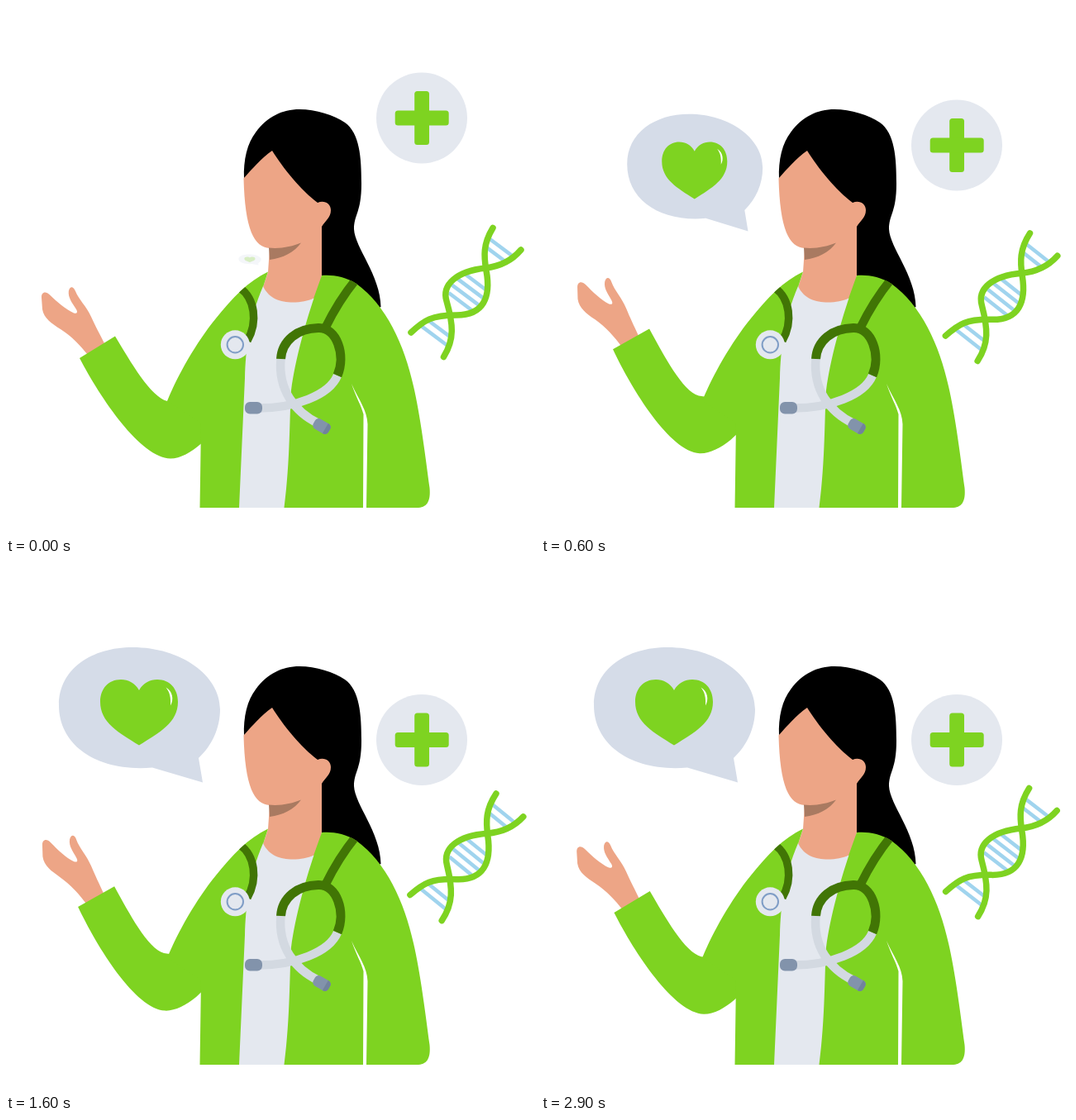
Write an HTML page with a canvas that moves like this. It is 640x640 px and loops after 3000 ms.

```html
<!DOCTYPE html>
<html lang="en">
<head>
<meta charset="utf-8">
<title>Doctor</title>
<style>
  html, body { margin: 0; width: 100%; height: 100%; overflow: hidden; background: #fff; }
  canvas { display: block; width: 640px; height: 640px; }
</style>
</head>
<body>
<canvas id="stage" width="640" height="640"></canvas>
<script>
const ctx = document.getElementById('stage').getContext('2d');
const LOOP = 3000, STEP = 100;

const GREEN = '#7ed321', DARK = '#417505', SKIN = '#eda586', SHADE = '#a97a61';
const PALE = '#e4e8ef', BUBBLE = '#d5dce8', TUBE = '#d3d9e1', TIP = '#8293ab';
const RUNG = '#a0d4ee';

const shapes = {
  hair: 'M288 209C287 186 292 166 302 153C316 134 334 125 355 125C375 125 397 132 410 141C428 154 430 183 430 215C430 250 421 252 421 270C422 292 453 326 453.5 364L420 380L382 340V250L320 180Z',
  face: 'M287.5 208.5C297 198 309 184 322 175C335 196 357 223 377 238C385 234.500 393 239 393 247C393 256 386 260 382 267V326L372 380H311V340L317 322L319 293C300 292 289 270 287.500 208.500Z',
  chin: 'M318 292.500C332 294 346 291 357 286.500C349 298 335 305 319 307Z',
  hand: 'M43 353C42.500 346 48 344.500 53 349.500C62 358 72 367 82 371.500C86 372.500 87 370.500 85 367C80 359 75 353 75.800 345C77 338.500 81.500 338.500 84 345C88 355 97 363 103 376C108 387 113 396 120 410L99 422C90 411 80 400 66 391C55 384 46 378 44 367Z',
  sleeve: 'M89 426L132 399.500C151 431 175 473 195 478L205 479L260 450V505L236 529.500C224 540 211 547.500 199 547.500C163 547 114 474 89 426Z',
  coat: 'M234.500 607L236 505L195 478C208 446 231 406 253.500 378.500C274 353 293 333 317 321.500L311 340L340 400L372 354L382 326C395 325 410 327 424 336C460 362 482 410 493 460C501 494 507.500 545 512.500 583C514 600 509 607 497 607Z',
  shirt: 'M311 339C318 354 332 358.500 347 358.500C357 358.500 365 357 372.500 353.500C363 382 350 427 345 465C343 492 344 550 336.500 607H282L289 450C290 415 294 379 311 339Z',
  gap: 'M418 457C423 472 430 484 432.500 494L432 607H436L437.500 506C437 489 427 477 418 457Z',
  bubble: 'M64 172C64 128 104 102 153 102C212 102 259 136 259 177C259 200 249 221 233 236L238 265.500L177 247.500C112 253 64 222 64 172Z',
  heart: 'M161 154C166 145 174 141 183 141C198 141 208 152 208 168C208 193 186 205 161 220.500C136 205 114 193 114 168C114 152 124 141 139 141C148 141 156 145 161 154Z',
  shine: 'M193.500 150.500C201.500 155 203.500 165 199 172.500C199.500 163 198.500 157 193.500 150.500Z',
  strapL: 'M283 341C301 354 305 382 292 405',
  strapR: 'M424 330Q402 357 386 390',
  loop: 'M332.500 427C334 405 352 390 378 389.500C400 389 411.500 422 401 447',
  tubeA: 'M332.500 427C329 464 349 491 378 505',
  tubeB: 'M401 447C391 471 349 486.500 306 486.500',
  strandA: 'M589 268.500C577 288 578 303 581 320C587 352 578 374 545 374C515 374 506 380 490 395',
  strandB: 'M623 295C612 308 598 315 580 317C545 321 527 337 533 357C541 385 543 403 529.500 424.500'
};
for (const name in shapes) shapes[name] = new Path2D(shapes[name]);

// Poses at every 200 ms
const growX = [0, .25, .56, .815, .96, 1.005, 1.003, 1];
const growY = [0, .23, .545, .855, .97, 1.002, 1.002, 1];
const dnaTurn = [0, .18, .36, .57, .77, .93, 1.05, 1.05, .93, .77, .57, .4, .36];
const armTurn = [0, .4, .75, 1, .9, .58, .68, .9, .93, .76, .57, .37, .27];

// Smooth curve through evenly spaced poses, holding the last one
function track(keys, t) {
  const pos = Math.min(t / 200, keys.length - 1);
  const i = Math.floor(pos), f = pos - i;
  const at = k => keys[Math.max(0, Math.min(keys.length - 1, k))];
  const a = at(i - 1), b = at(i), c = at(i + 1), d = at(i + 2);
  return b + f * (c - a + f * (2 * a - 5 * b + 4 * c - d + f * (3 * (b - c) + d - a))) / 2;
}

function fill(path, color) {
  ctx.fillStyle = color;
  ctx.fill(path);
}

function stroke(path, color, width, cap = 'butt') {
  ctx.strokeStyle = color;
  ctx.lineWidth = width;
  ctx.lineCap = cap;
  ctx.stroke(path);
}

function disc(x, y, r, color) {
  ctx.beginPath();
  ctx.arc(x, y, r, 0, Math.PI * 2);
  ctx.fillStyle = color;
  ctx.fill();
}

function box(x, y, w, h, r, color) {
  ctx.beginPath();
  ctx.roundRect(x, y, w, h, r);
  ctx.fillStyle = color;
  ctx.fill();
}

function group(draw) {
  ctx.save();
  draw();
  ctx.restore();
}

function turn(x, y, angle) {
  ctx.translate(x, y);
  ctx.rotate(angle);
  ctx.translate(-x, -y);
}

function drawBadge(t) {
  const p = Math.min(1, t / 1400);
  const ease = p + .22 * (p * p * (3 - 2 * p) - p);
  const y = 135.5 + 78.5 * ease;
  disc(503, y, 55, PALE);
  box(494.2, y - 32.5, 17.8, 65, 3.5, GREEN);
  box(470.7, y - 9, 65, 18, 3.5, GREEN);
}

function drawDna(t) {
  turn(327, 372, .043 * track(dnaTurn, t));
  const rungs = new Path2D();
  for (const d of [-67, -56.5, -15, -5, 5, 15, 56.5, 67]) {
    const half = 22 * Math.abs(Math.cos(Math.PI * d / 71.4));
    const x = 558.5 + .6 * d, y = 345.5 - .8 * d;
    rungs.moveTo(x - .8 * half, y - .6 * half);
    rungs.lineTo(x + .8 * half, y + .6 * half);
  }
  stroke(rungs, RUNG, 4.5);
  stroke(shapes.strandA, GREEN, 7.5, 'round');
  stroke(shapes.strandB, GREEN, 7.5, 'round');
}

function drawBubble(t) {
  const px = track(growX, t), py = track(growY, t);
  ctx.globalAlpha = Math.min(1, .25 + t / 300);
  ctx.translate(295 - 133.5 * px, 307 - 123.25 * py);
  ctx.scale(.14 + .86 * px, .08 + .92 * py);
  ctx.translate(-161.5, -183.75);
  fill(shapes.bubble, BUBBLE);
  fill(shapes.heart, GREEN);
  fill(shapes.shine, '#fff');
}

function drawArm(t) {
  turn(350, 372, .041 * track(armTurn, t));
  fill(shapes.hand, SKIN);
  fill(shapes.sleeve, GREEN);
}

function drawStethoscope() {
  group(() => {
    ctx.clip(shapes.coat);
    stroke(shapes.strapL, DARK, 9.5);
    stroke(shapes.strapR, DARK, 10.5);
  });
  stroke(shapes.tubeA, TUBE, 10.5);
  stroke(shapes.tubeB, TUBE, 10.5);
  stroke(shapes.loop, DARK, 11);
  box(289, 479, 21, 14.5, 6, TIP);
  group(() => {
    ctx.translate(382, 508.5);
    ctx.rotate(Math.PI / 6);
    box(-10.5, -7, 21, 14, 5, TIP);
    box(5, -7, 5.5, 14, [0, 5, 5, 0], '#71839c');
  });
  disc(277.3, 409.8, 17.5, PALE);
  const ring = new Path2D();
  ring.arc(277.3, 409.8, 9.7, 0, Math.PI * 2);
  stroke(ring, '#7f9dc6', 2);
}

function drawDoctor(t) {
  fill(shapes.hair, '#000');
  fill(shapes.face, SKIN);
  fill(shapes.chin, SHADE);
  group(() => drawArm(t));
  fill(shapes.coat, GREEN);
  fill(shapes.shirt, PALE);
  fill(shapes.gap, '#fff');
  drawStethoscope();
}

function render(now) {
  const t = Math.floor(now % LOOP / STEP) * STEP;
  ctx.fillStyle = '#fff';
  ctx.fillRect(0, 0, 640, 640);
  drawBadge(t);
  group(() => drawDna(t));
  group(() => drawBubble(t));
  drawDoctor(t);
}

let start;
function tick(now) {
  if (start === undefined) start = now;
  render(now - start);
  requestAnimationFrame(tick);
}
render(0);
requestAnimationFrame(tick);
</script>
</body>
</html>
```
